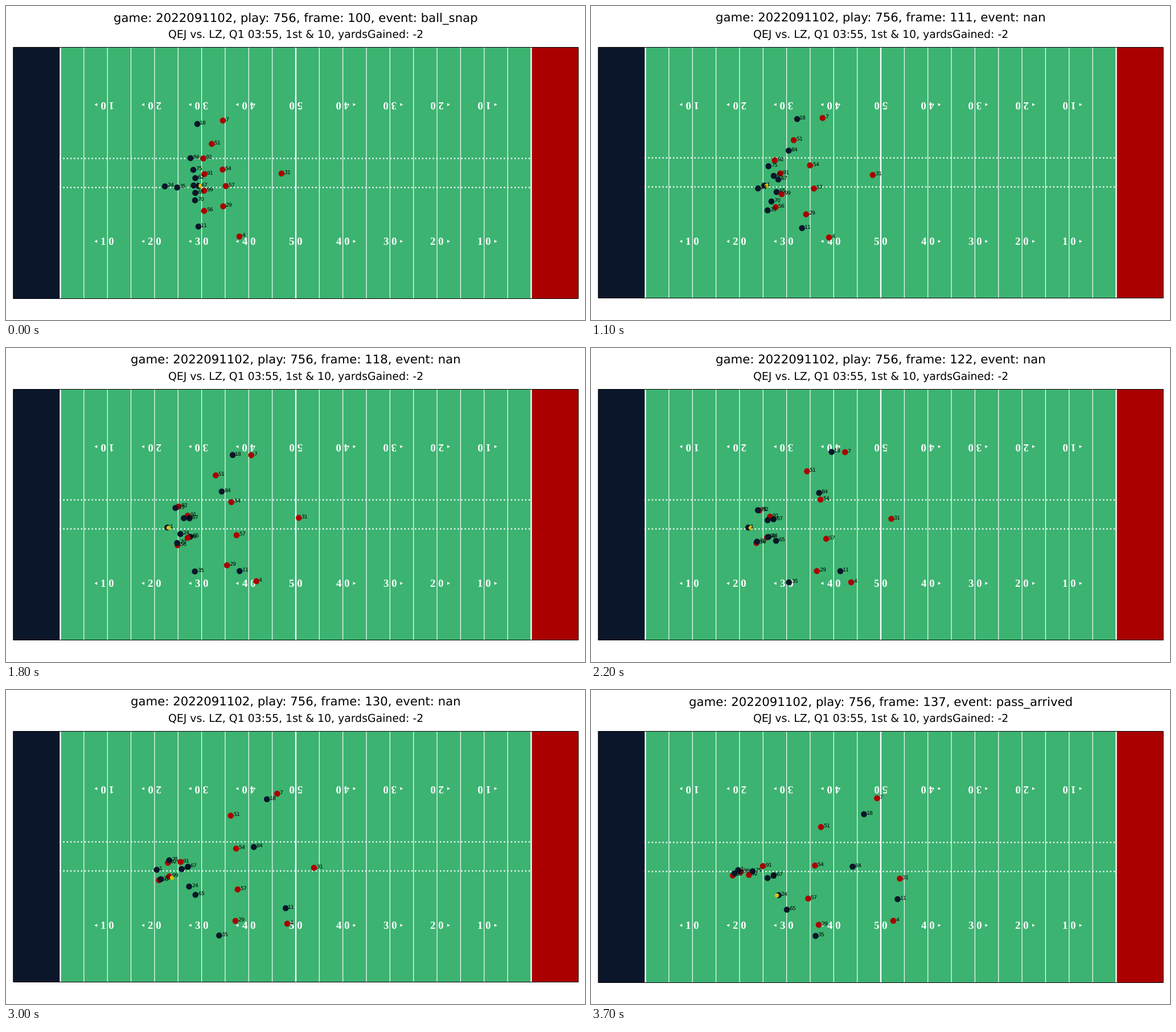
These frames come from a looping animation (1017x551 px, 3800 ms). A matplotlib script:

```python
import numpy as np
import matplotlib.pyplot as plt
from matplotlib.animation import FuncAnimation
from matplotlib.patches import Polygon, Rectangle

WIDTH, HEIGHT, DPI = 1017, 551, 64
PX = 72 / DPI                      # points per pixel
FRAMES, INTERVAL = 38, 100
LAST = FRAMES - 1
NAVY, RED, GRASS, BALL = "#0b162a", "#aa0000", "#3cb371", "#dfc00c"
TOP, BOTTOM = 72.5, 512.5
THROW = 27
EVENTS = {0: "ball_snap", THROW: "pass_forward", LAST: "pass_arrived"}

plt.rcParams["text.hinting"] = "none"
fig = plt.figure(figsize=(WIDTH / DPI, HEIGHT / DPI), dpi=DPI, facecolor="white")
ax = fig.add_axes([0, 0, 1, 1])
ax.set_xlim(0, WIDTH)
ax.set_ylim(HEIGHT, 0)
ax.axis("off")


def yard_x(yard):
    return 12.8 + 8.27 * yard


# Field
def zone(first, last, color):
    left, right = yard_x(first), yard_x(last)
    ax.add_patch(Rectangle((left, TOP), right - left, BOTTOM - TOP + 0.5,
                           facecolor=color, linewidth=0, snap=False))


def arrow(x, y, direction):
    tip, back = x + 2.6 * direction, x - 2.4 * direction
    ax.add_patch(Polygon([(tip, y), (back, y - 2.6), (back, y + 2.6)],
                         facecolor="white", linewidth=0, zorder=2.2))


def yard_number(yard):
    x, value = yard_x(yard), min(yard, 120 - yard) - 10
    direction = np.sign(yard - 60)
    for baseline, middle, angle in ((419, 413, 0), (167, 173, 180)):
        ax.text(x, baseline, " ".join(str(value)), color="white",
                family="Liberation Serif", weight="bold", size=18.83 * PX,
                ha="center", va="baseline", rotation=angle,
                rotation_mode="anchor", zorder=2.2)
        if direction:
            arrow(x + 20.3 * direction, middle, direction)


zone(0, 10, NAVY)
zone(10, 110, GRASS)
zone(110, 120, RED)

for yard in range(10, 111, 5):
    width = 2.35 if yard in (10, 60, 110) else 1.18
    ax.vlines(yard_x(yard), TOP, BOTTOM + 0.5, color="white", linewidth=width * PX,
              snap=False, zorder=2)
for yard in range(20, 101, 10):
    yard_number(yard)

HASH_ROWS = (266.5, 317.5)
hashes = [ax.plot([yard_x(10) - 1.3, yard_x(110)], [y, y], ":", color="white",
                  linewidth=2.355 * PX, snap=False, zorder=2)[0] for y in HASH_ROWS]
border = ax.add_patch(Rectangle((yard_x(0), TOP), yard_x(120) - yard_x(0), BOTTOM - TOP,
                                fill=False, edgecolor="black", linewidth=PX,
                                snap=False, zorder=2.5))

title = ax.text(508.8, 28, "", size=21.2 * PX, ha="center", va="baseline")
ax.text(508.8, 56, "QEJ vs. LZ, Q1 03:55, 1st & 10, yardsGained: -2",
        size=18.9 * PX, ha="center", va="baseline")


# Motion
def run(*waypoints):
    """Smooth path from a standing start through evenly timed waypoints."""
    points = np.array(waypoints, float)
    speed = np.gradient(points, axis=0, edge_order=2)
    speed[0] = 0
    legs = len(points) - 1
    s = np.linspace(0, legs, FRAMES)
    i = np.minimum(s.astype(int), legs - 1)
    u = (s - i)[:, None]
    return ((1 + 2 * u) * (1 - u) ** 2 * points[i] + u * (1 - u) ** 2 * speed[i]
            + u * u * (3 - 2 * u) * points[i + 1] - u * u * (1 - u) * speed[i + 1])


def ball_flight(passer, receiver):
    """Handled by the passer until the throw, then straight to the receiver."""
    frame = np.arange(FRAMES)[:, None]
    held = passer + np.abs(frame - 16) * [0.7, 0]
    u = np.clip((frame - THROW) / (LAST - THROW), 0, 1)
    return np.where(frame < THROW, held,
                    held[THROW] + u * (receiver[LAST] - [3.5, 0] - held[THROW]))


# Jersey number: team and path, from bottom to top layer
players = {
    31: (RED, run((484, 294), (497.5, 297), (534, 302.5), (542.5, 331))),
    84: (NAVY, run((324, 267), (352, 253), (413.5, 259), (459.5, 310))),
    92: (RED, run((346.5, 267.5), (302, 279), (277.5, 324.5))),
    91: (RED, run((348.5, 295), (318.5, 294.5), (302, 309))),
    65: (NAVY, run((332.5, 328), (323.5, 332), (344, 385.5))),
    62: (NAVY, run((332.5, 302), (312, 299), (310, 330))),
    56: (RED, run((348, 359.5), (300, 345.5), (249, 325.5))),
    18: (NAVY, run((336, 207), (367.5, 197), (436.5, 182.5), (479.5, 218))),
    54: (RED, run((380.5, 287), (386, 278.5), (405.5, 267), (393.5, 308))),
    7: (RED, run((381, 201), (411, 195.5), (456.5, 181), (502.5, 190))),
    4: (RED, run((410, 404.5), (421, 406.5), (469, 411.5), (531, 405))),
    57: (RED, run((386, 316), (393, 321.5), (414.5, 339.5), (381.5, 366))),
    67: (NAVY, run((338, 316), (322, 299), (321, 325))),
    51: (RED, run((361.5, 242), (357, 234), (385.5, 215), (404, 240.5))),
    99: (RED, run((348, 324), (318, 333), (263, 319))),
    11: (NAVY, run((338, 387), (377, 390), (456, 390), (538.5, 367))),
    1: (NAVY, run((329.5, 315), (282.5, 315), (258.5, 316))),
    75: (NAVY, run((329, 287.5), (297, 281), (284, 318))),
    29: (RED, run((381.5, 351.5), (378.5, 368), (400.5, 397), (400, 412))),
    24: (NAVY, run((279, 316.5), (307, 327), (329.5, 360))),
    70: (NAVY, run((332, 341), (299.5, 342), (252, 322))),
    35: (NAVY, run((300.5, 318.5), (313, 364.5), (357.5, 420.5), (394.5, 431.5))),
}
colors = [color for color, _ in players.values()]
paths = np.array([path for _, path in players.values()])
ball_path = ball_flight(passer=players[1][1], receiver=players[24][1])

dots = ax.scatter(*paths[:, 0].T, s=(10.6 * PX) ** 2, c=colors, linewidths=0, zorder=3)
ball = ax.scatter(*ball_path[:1].T, s=(7.4 * PX) ** 2, c=BALL, linewidths=0, zorder=3.5)
labels = [ax.text(0, 0, str(number), size=9.42 * PX, va="baseline", zorder=4)
          for number in players]


def update(frame):
    event = EVENTS.get(frame, "nan")
    title.set_text(f"game: 2022091102, play: 756, frame: {100 + frame}, event: {event}")

    # The layout sits one pixel lower whenever the title names an event.
    shift = int(frame in EVENTS)
    border.set_height(BOTTOM - TOP + shift)
    for line, y in zip(hashes, HASH_ROWS):
        line.set_ydata([y + shift] * 2)

    dots.set_offsets(paths[:, frame])
    ball.set_offsets(ball_path[frame])
    for label, (x, y) in zip(labels, paths[:, frame]):
        label.set_position((x + 4.2, y + 0.8))
    return [title, border, dots, ball, *hashes, *labels]


animation = FuncAnimation(fig, update, frames=FRAMES, interval=INTERVAL,
                          repeat=True, repeat_delay=0, blit=False)
plt.show()
```
